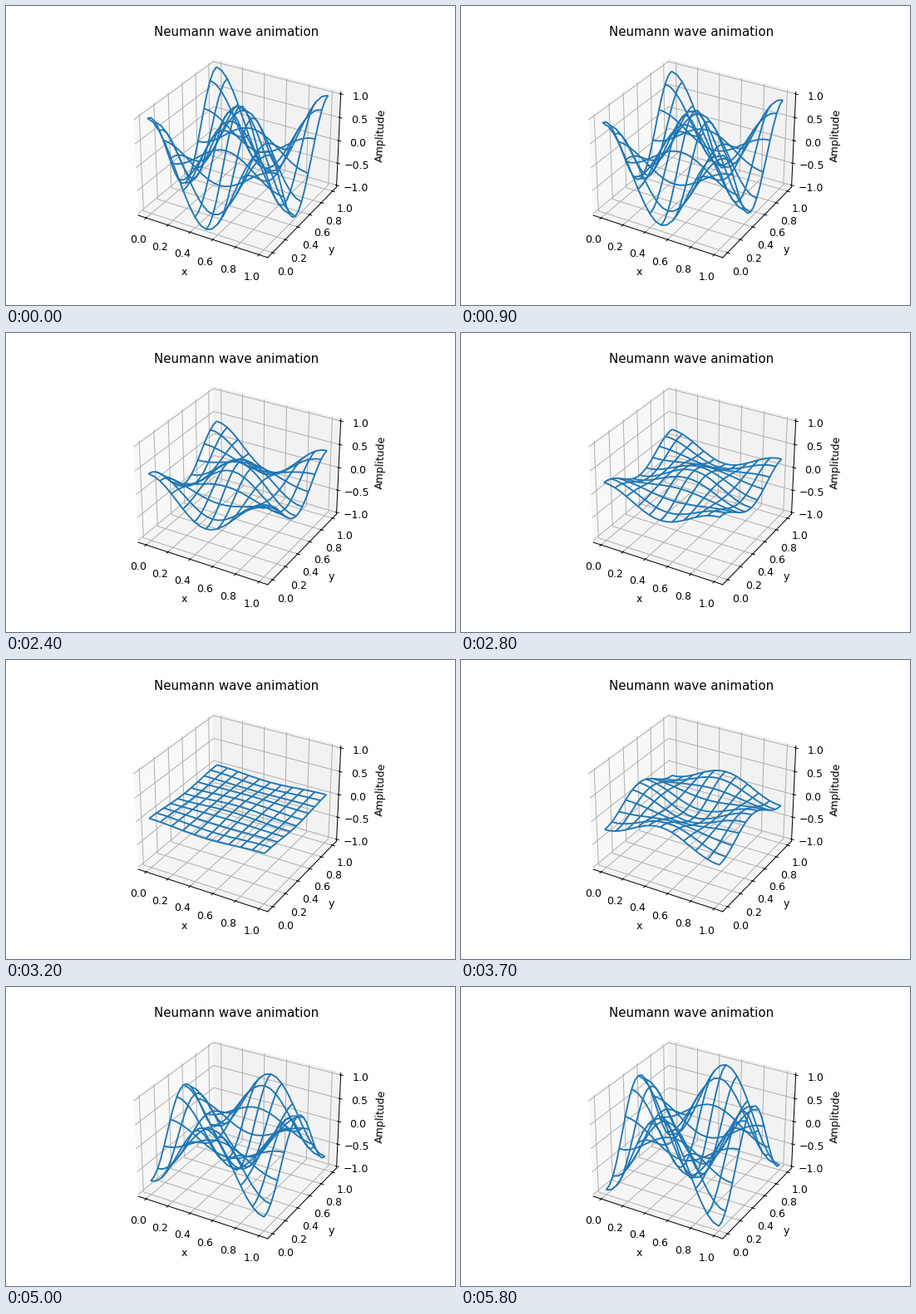
Animation, 540 px wide and 360 px high, one loop 5.9 s. Source, as a matplotlib script:

```python
import numpy as np
import matplotlib.pyplot as plt
from matplotlib.animation import FuncAnimation

FRAMES = 59
INTERVAL = 100
OMEGA = 0.0481        # phase advance per frame
PAD = 25 / 24         # small view margin around the limits

s = np.linspace(0, 1, 21)
X, Y = np.meshgrid(s, s, indexing="ij")
MODE = np.cos(2 * np.pi * X) * np.cos(2 * np.pi * Y)

fig = plt.figure(figsize=(6, 4), dpi=90)
ax = fig.add_subplot(projection="3d")


def padded(center, half):
    return center - half * PAD, center + half * PAD


ax.set_xlim(padded(0.5, 0.55))
ax.set_ylim(padded(0.5, 0.55))
ax.set_zlim(padded(0, 1))
ax.set_xlabel("x")
ax.set_ylabel("y")
ax.set_zlabel("Amplitude")
ax.set_title("Neumann wave animation")


def update(i):
    for old in list(ax.collections):
        old.remove()
    Z = MODE * np.cos(OMEGA * i)
    return [ax.plot_wireframe(X, Y, Z, rstride=2, cstride=2, color="C0")]


anim = FuncAnimation(fig, update, frames=FRAMES, interval=INTERVAL,
                     init_func=lambda: update(0), repeat=True)
plt.show()
```
